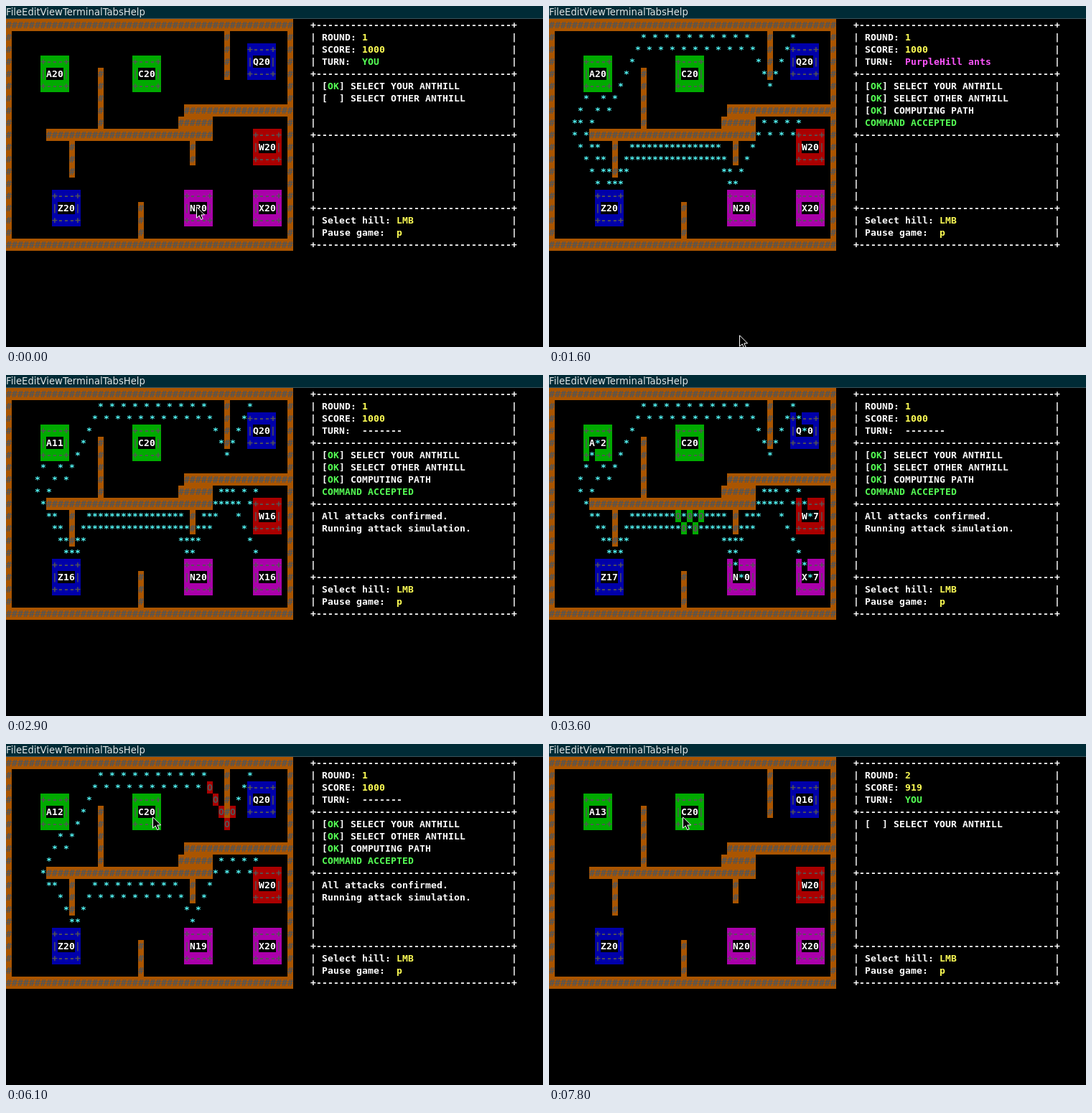
Recreate the animation shown at these times as an HTML page with a canvas. Size 748x475 px, loop 8 s.

```html
<!DOCTYPE html>
<html lang="en">
<head>
<meta charset="utf-8">
<title>Ants</title>
<style>
html, body { margin: 0; width: 748px; height: 475px; overflow: hidden; background: #000; }
canvas { display: block; }
</style>
</head>
<body>
<canvas id="stage" width="748" height="475"></canvas>
<script>
const ctx = document.getElementById('stage').getContext('2d');
const CW = 8, CH = 17, TOP = 18, COLS = 50, ROWS = 19;
const LOOP = 8000, TICK = 100, LAUNCH = 2000, END = 6700, NEXT = 7500, GROUP = 5, FULL = 20;
const WHITE = '#fff', DIM = '#555', YELLOW = '#ff5', LIME = '#5f5', CYAN = '#5ff';
const GREEN = '#0a0', BLUE = '#00a', RED = '#a00', PURPLE = '#a0a', WALL = '#a50';

// Inner walls: column, row, width, height
const walls = [
  [38, 1, 1, 4], [16, 4, 1, 5], [31, 7, 18, 1], [30, 8, 6, 1],
  [7, 9, 29, 1], [11, 10, 1, 3], [32, 10, 1, 2], [23, 15, 1, 3]
];
const hill = (c, r, color) => ({ c, r, color, mid: [c + 2, r + 1] });
const hills = {
  A: hill(6, 3, GREEN), C: hill(22, 3, GREEN), Q: hill(42, 2, BLUE), W: hill(43, 9, RED),
  Z: hill(8, 14, BLUE), N: hill(31, 14, PURPLE), X: hill(43, 14, PURPLE)
};
const names = Object.keys(hills);

const inBox = (x, y, c, r, w, h) => x >= c && x < c + w && y >= r && y < r + h;
const isWall = (x, y) => !inBox(x, y, 1, 1, COLS - 2, ROWS - 2) || walls.some(w => inBox(x, y, ...w));
const hillAt = (x, y) => names.find(k => inBox(x, y, hills[k].c, hills[k].r, 5, 3));

// Left before right, diagonals before straight moves
const moves = [-1, 0, 1].flatMap(dx => [-1, 1, 0].map(dy => [dx, dy]));

// Steps from one hill to every cell; other hills are obstacles
function distances(from, to) {
  const start = hills[from].mid, dist = new Map([[start.join(), 0]]), queue = [start];
  for (const [x, y] of queue) {
    for (const [dx, dy] of moves) {
      const cell = [x + dx, y + dy], key = cell.join(), k = hillAt(...cell);
      if (dist.has(key) || isWall(...cell) || (k && k !== from && k !== to)) continue;
      dist.set(key, dist.get([x, y].join()) + 1);
      queue.push(cell);
    }
  }
  return dist;
}
function route(from, to) {
  const dist = distances(to, from), cells = [hills[from].mid];
  for (let left = dist.get(cells[0].join()); left > 0; left--) {
    const [x, y] = cells[cells.length - 1];
    const [dx, dy] = moves.find(([dx, dy]) => dist.get([x + dx, y + dy].join()) === left - 1);
    cells.push([x + dx, y + dy]);
  }
  return cells;
}

// Position of the first ant along its path
const head = t => Math.floor(51 + (t - 4900) * (t < 4900 ? 0.02 : 0.0175));
function arrival(length) {
  let t = LAUNCH;
  while (head(t) < length) t += TICK;
  return t;
}
const attacks = ['AN', 'WQ', 'ZA', 'XA'].map(([from, to], i) => {
  const cells = route(from, to);
  return { from, to, cells, flood: distances(from, to), planned: 1000 + 300 * i, arrives: arrival(cells.length - 1) };
});
const byArrival = [...attacks].sort((a, b) => a.arrives - b.arrives);

function counts(t) {
  const n = Object.fromEntries(names.map(k => [k, FULL]));
  for (let s = LAUNCH; s <= t; s += TICK) {
    for (const a of attacks) {
      if (s <= 2400) n[a.from] = FULL - Math.floor((s - LAUNCH) / 80);
      if (s === a.arrives) n[a.to] -= GROUP;
    }
    if (s > 2400 && s < END && s % 500 === 400)
      for (const k of names) n[k] = Math.min(FULL, n[k] + 1);
  }
  return n;
}

function rect(c, r, w, h, color) {
  ctx.fillStyle = color;
  ctx.fillRect(c * CW, TOP + r * CH, w * CW, h * CH);
}
function print(c, r, text, color = WHITE) {
  ctx.fillStyle = color;
  [...text].forEach((ch, i) => ctx.fillText(ch, (c + i) * CW, TOP + r * CH + 13));
}
function cell(x, y, ch, color, back) {
  rect(x, y, 1, 1, back);
  print(x, y, ch, color);
}

function drawWall(c, r, w, h) {
  rect(c, r, w, h, WALL);
  for (let i = 0; i < h; i++) print(c, r + i, '#'.repeat(w), DIM);
}
function drawHill({ c, r, color }, label) {
  rect(c, r, 5, 3, color);
  ['+---+', '|   |', '+---+'].forEach((line, i) => print(c, r + i, line, DIM));
  rect(c + 1, r + 1, 3, 1, '#000');
  print(c + 1, r + 1, label);
}

function drawMap(t) {
  for (const a of attacks) {
    if (t < a.planned - TICK || t >= a.planned) continue;
    for (const [key, d] of a.flood)
      if (d < a.cells.length) print(...key.split(',').map(Number), '*', '#0aa');
  }

  [[0, 0, COLS, 1], [0, ROWS - 1, COLS, 1], [0, 1, 1, ROWS - 2], [COLS - 1, 1, 1, ROWS - 2], ...walls]
    .forEach(w => drawWall(...w));
  const n = counts(t);
  for (const k of names) drawHill(hills[k], k + n[k]);

  // One marching group is visible at a time, shortly after the one before arrived
  const lead = byArrival.findIndex(a => t - 200 < a.arrives);
  for (const a of attacks) {
    if (t < a.planned || t >= a.arrives) continue;
    for (const [x, y] of a.cells)
      if (lead === 1 || !hillAt(x, y)) cell(x, y, '*', CYAN, '#000');
  }
  const group = byArrival[lead];
  if (lead < 1 || t >= group.arrives) return;
  for (let i = 0; i < GROUP; i++) {
    const spot = group.cells[head(t) - i];
    if (spot && !hillAt(...spot)) cell(...spot, 'O', DIM, hills[group.from].color);
  }
}

const turns = [['YOU', LIME], ['RedHill ants', '#f55'], ['BlueHill ants', '#55f'],
  ['PurpleHill ants', '#f5f'], ['-------', WHITE]];

function drawPanel(t) {
  const left = 53, text = 55, width = 36, next = t >= NEXT;
  for (let r = 0; r < ROWS; r++) {
    const edge = [0, 4, 9, 15, 18].includes(r);
    print(left, r, edge ? '+' + '-'.repeat(width - 2) + '+' : '|' + ' '.repeat(width - 2) + '|');
  }
  const field = (r, name, c, value, color = YELLOW) => { print(text, r, name); print(c, r, value, color); };
  const planned = next ? 0 : attacks.filter(a => t >= a.planned).length;
  field(1, 'ROUND:', 62, next ? '2' : '1');
  field(2, 'SCORE:', 62, next ? '919' : '1000');
  field(3, 'TURN:', 62, ...turns[planned]);
  field(16, 'Select hill:', 68, 'LMB');
  field(17, 'Pause game:', 68, 'p');

  const step = (r, name, ok) => field(r, '[  ] ' + name, text + 1, ok ? 'OK' : '', LIME);
  if (next) {
    if (t >= 7800) step(5, 'SELECT YOUR ANTHILL', false);
    return;
  }
  step(5, 'SELECT YOUR ANTHILL', true);
  step(6, 'SELECT OTHER ANTHILL', t >= 800);
  if (t >= 800) step(7, 'COMPUTING PATH', planned > 0);
  if (planned > 0) print(text, 8, 'COMMAND ACCEPTED', LIME);
  if (planned === attacks.length) print(text, 10, 'All attacks confirmed.');
  if (t >= LAUNCH) print(text, 11, 'Running attack simulation.');
  if (t >= END) print(text, 12, 'Simulation finished.');
}

// Pointer stops: time, x, y
const stops = [
  [0, 265, 279], [1400, 265, 279], [1700, 265, 480], [5100, 321, 480], [5900, 204, 101],
  [6200, 204, 101], [6700, 187, 120], [7000, 187, 120], [7100, 186, 101], [LOOP, 186, 101]
];
const arrow = new Path2D('M.5 .8V16.2L4.2 12.8L6.7 18.5L9.2 17.4L6.8 11.9H11.6Z');
function drawPointer(t) {
  const i = stops.findIndex(s => s[0] > t), [t0, x0, y0] = stops[i - 1], [t1, x1, y1] = stops[i];
  const p = (t - t0) / (t1 - t0), mix = (a, b) => Math.round(a + (b - a) * p * (2 - p));
  ctx.save();
  ctx.translate(mix(x0, x1), mix(y0, y1));
  ctx.fillStyle = '#000';
  ctx.strokeStyle = '#fff';
  ctx.fill(arrow);
  ctx.stroke(arrow);
  ctx.restore();
}

function draw(t) {
  ctx.fillStyle = '#000';
  ctx.fillRect(0, 0, 748, 475);
  ctx.fillStyle = '#002b36';
  ctx.fillRect(0, 0, 748, TOP - 1);
  ctx.fillStyle = '#39535b';
  ctx.fillRect(0, TOP - 1, 748, 1);
  ctx.font = '13.2px "DejaVu Sans", sans-serif';
  ctx.fillStyle = '#dfe3e4';
  ctx.fillText('FileEditViewTerminalTabsHelp', 0, 13);
  ctx.font = 'bold 13px "DejaVu Sans Mono", monospace';
  drawMap(t);
  drawPanel(t);
  drawPointer(t);
}

const begin = performance.now();
let last = -1;
function frame() {
  const t = Math.floor(((performance.now() - begin) % LOOP) / TICK) * TICK;
  if (t !== last) draw(last = t);
  requestAnimationFrame(frame);
}
frame();
</script>
</body>
</html>
```
